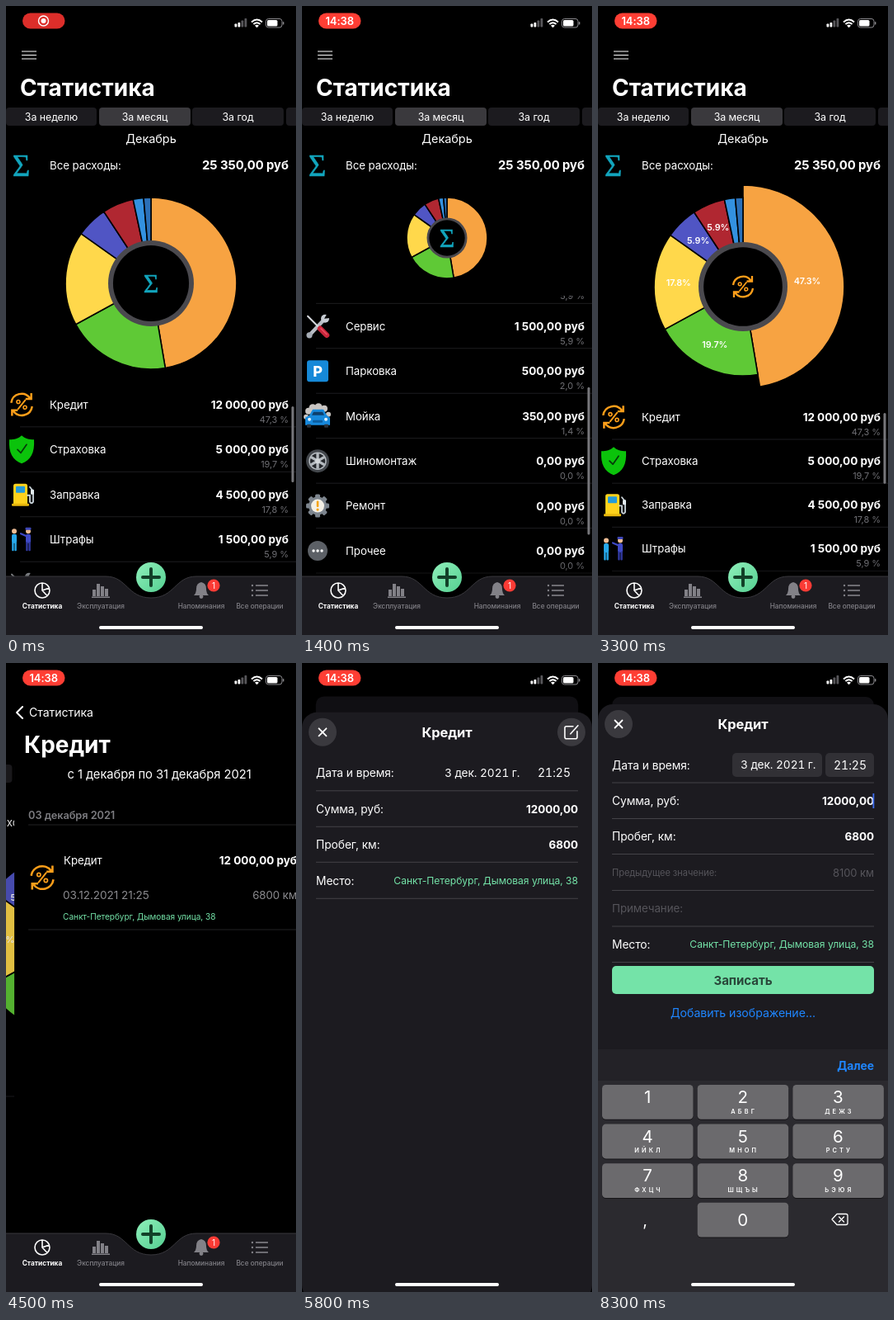
These frames come from a looping animation (352 by 762 pixels, 8.4 s). An HTML page:

```html
<!DOCTYPE html>
<html lang="ru">
<head>
<meta charset="utf-8">
<title>Статистика расходов</title>
<style>
html, body { margin: 0; width: 100%; height: 100%; overflow: hidden; background: #000; }
svg { display: block; width: 352px; height: 762px; }
text { font-family: Inter, "Noto Sans", sans-serif; letter-spacing: -.005em; }
text.sum { font-family: "Liberation Serif", "Noto Serif", serif; letter-spacing: 0; }
text.small { letter-spacing: 0; }
text.tab { font-variant-numeric: tabular-nums; }
text.keys { letter-spacing: .42em; }
</style>
</head>
<body>
<svg id="stage" viewBox="0 0 352 762"></svg>
<script>
const LOOP = 8400, ORANGE = '#ff9f1a', MINT = '#74e3a8', GRAY = '#8a8a8e', BLUE = '#1f86ff';
const ADDRESS = 'Санкт-Петербург, Дымовая улица, 38';

// y is the middle of the capitals
const text = (x, y, str, size, { fill = '#fff', w = 400, at = 'start', cls = '' } = {}) =>
  `<text x="${x}" y="${(y + size * .364).toFixed(2)}" font-size="${size}" fill="${fill}" font-weight="${w}" text-anchor="${at}" class="${cls}">${str}</text>`;
const rect = (x, y, w, h, fill, r = 0) => `<rect x="${x}" y="${y}" width="${w}" height="${h}" rx="${r}" fill="${fill}"/>`;
const circle = (x, y, r, fill, more = '') => `<circle cx="${x}" cy="${y}" r="${r}" fill="${fill}" ${more}/>`;
const line = (d, color, w = 1, more = '') => `<path d="${d}" fill="none" stroke="${color}" stroke-width="${w}" ${more}/>`;
const shape = (d, fill) => `<path d="${d}" fill="${fill}"/>`;
const group = (id, body) => `<g id="${id}">${body}</g>`;
const at = (x, y, body, scale = 1) => `<g transform="translate(${x} ${y}) scale(${scale})">${body}</g>`;
const turn = (angle, body) => `<g transform="rotate(${angle})">${body}</g>`;
const round = 'stroke-linecap="round" stroke-linejoin="round"';
const sigma = (x, y, size) =>
  `<text class="sum" x="${x}" y="${y + size * .33}" font-size="${size}" fill="#12a5bd" stroke="#12a5bd" stroke-width=".5" text-anchor="middle">Σ</text>`;

// ---- Icons, centred on 0,0 ----
const arrow = line('M-12-2A12 12 0 0 1 9.5-7.5M11-13V-6.5H4.5', ORANGE, 2.3);
const person = (x, coat, legs) => circle(x, -10, 3, '#eebd95') + rect(x - 3, -6.5, 6, 11, coat, 2) +
  rect(x - 2.8, 3, 2.4, 11, legs, 1) + rect(x + .4, 3, 2.4, 11, legs, 1);
const icons = {
  credit: arrow + turn(180, arrow) + line('M4-5L-4 5', ORANGE, 1.8, round) +
    circle(-3.8, -3.2, 1.9, 'none', `stroke="${ORANGE}" stroke-width="1.5"`) +
    circle(3.8, 3.2, 1.9, 'none', `stroke="${ORANGE}" stroke-width="1.5"`),
  shield: shape('M0-17C4-13 9-12 15-12C16 4 11 13 0 17C-11 13-16 4-15-12C-9-12-4-13 0-17Z', '#0bc30b') +
    line('M-5 0L-1 4L6-6', '#06380a', 1.7, round),
  fuel: rect(-10, -13, 17, 26, '#ffd21c', 2.5) + rect(-7, -10, 11, 8, '#249bd8', 1) + rect(-12, 11, 21, 3, '#e9b80d', 1) +
    line('M7 1H10V9Q12 12 14 9V-4L10-9', '#c9d3da', 1.8, round) + rect(11, -6, 4, 6, '#e4edf2', 1),
  fines: person(-9, '#27a8ea', '#27a8ea') + person(8, '#3f49c6', '#3139a0') + rect(4.5, -14.5, 7, 3, '#3c45b5', 1) +
    line('M6-4L-1-7', '#3f49c6', 2.2, round),
  service: line('M-9 10L8-8', '#b7bcc4', 4.5, round) + circle(9, -9, 5, '#c6cbd2') + shape('M8-9L12-16L17-10Z', '#000') +
    circle(-10, 11, 3.6, '#a5abb4') + line('M-12-12L1 1', '#d6d9de', 2, round) + line('M3 3L11 11', '#c8263a', 6.5, round) + line('M4 3L11 10', '#ec5064', 1.5, round),
  park: rect(-13, -13, 26, 26, '#1689d8', 3) + text(0, 0, 'P', 18, { w: 800, at: 'middle' }),
  wash: [[-11, -6, 4], [-6, -10, 4.5], [1, -11, 4.5], [8, -9, 4], [-14, 1, 3], [13, -2, 3]].map(c => circle(...c, '#c9c5c2')).join('') +
    shape('M-15 11V2L-10-1L-6-8H7L11-1L15 2V11Z', '#1789dc') + shape('M-7-1L-5-5H6L8-1Z', '#0d3f6c') +
    circle(-10, 4, 2, '#e3f3ff') + circle(10, 4, 2, '#e3f3ff') + rect(-6, 5, 12, 3, '#0c5d9f', 1) +
    rect(-13, 10, 5, 4, '#29323b', 1) + rect(8, 10, 5, 4, '#29323b', 1),
  tire: circle(0, 0, 14, '#43474c') + circle(0, 0, 10, '#24272b', 'stroke="#b4babf" stroke-width="1.5"') +
    [0, 60, 120].map(a => turn(a, rect(-1.7, -9.5, 3.4, 19, '#b4babf'))).join('') + circle(0, 0, 3, '#d3d7da'),
  repair: [0, 45, 90, 135].map(a => turn(a, rect(-3, -14, 6, 28, '#7d858e', 1.5))).join('') +
    circle(0, 0, 11, '#7d858e') + circle(0, 0, 8, '#f4f0e6') + rect(-1.3, -6, 2.6, 7.5, '#f6a415', 1) + circle(0, 4.5, 1.6, '#f6a415'),
  other: circle(0, 0, 12, '#5c6066') + [-5, 0, 5].map(x => circle(x, 0, 1.7, '#fff')).join('')
};

// ---- Data ----
const rows = [
  ['credit', 'Кредит', '12 000,00', '47,3'], ['shield', 'Страховка', '5 000,00', '19,7'],
  ['fuel', 'Заправка', '4 500,00', '17,8'], ['fines', 'Штрафы', '1 500,00', '5,9'],
  ['service', 'Сервис', '1 500,00', '5,9'], ['park', 'Парковка', '500,00', '2,0'],
  ['wash', 'Мойка', '350,00', '1,4'], ['tire', 'Шиномонтаж', '0,00', '0,0'],
  ['repair', 'Ремонт', '0,00', '0,0'], ['other', 'Прочее', '0,00', '0,0']
];
const slices = [[12000, '#f7a342'], [5000, '#5fc936'], [4500, '#ffd84b'], [1500, '#5055c4'], [1500, '#b02731'], [500, '#3391e0'], [350, '#2b70b8']];
const total = slices.reduce((n, s) => n + s[0], 0);

// ---- Statistics screen ----
const heading = label => text(17, 99, label, 28, { w: 700, cls: 'small' });
const segment = (x, w, label, fill) => rect(x, 123, w, 22, fill, 4) + text(x + w / 2, 134, label, 12.4, { at: 'middle' });
const listRow = ([icon, name, sum, pct], i) => group('row' + i,
  at(19, 0, icons[icon], icon === 'credit' ? 1.06 : 1) + text(53, 0, name, 13.3) +
  text(343, 0, sum + ' руб', 13.6, { w: 700, at: 'end' }) +
  text(343, 18, pct + ' %', 11, { fill: '#6f6f74', at: 'end' }) + line('M17 27H352', '#1d1d20'));
const mainScreen =
  group('header', line('M19 55H37M19 59.5H37M19 64H37', '#fff', 1.2) + heading('Статистика')) +
  segment(0, 110, 'За неделю', '#1c1b1f') + segment(113, 111, 'За месяц', '#3a393d') +
  segment(226, 111, 'За год', '#1c1b1f') + rect(340, 123, 30, 22, '#1c1b1f', 4) +
  text(176, 161, 'Декабрь', 14.5, { at: 'middle' }) +
  sigma(18.5, 193.5, 37) + text(53, 193, 'Все расходы:', 13.3) +
  text(343, 193, '25 350,00 руб', 14.9, { w: 700, at: 'end' }) +
  group('chart', slices.map((s, i) => `<path id="slice${i}" fill="${s[1]}" stroke="#000" stroke-width="1.6"/>`).join('') +
    circle(0, 0, 1, '#4a494e', 'id="ring"') + circle(0, 0, 1, '#000', 'id="hole"') +
    group('mark', sigma(0, 0, 32)) + group('pick', icons.credit) +
    group('labels', slices.slice(0, 5).map((s, i) => group('label' + i,
      text(0, 0, (s[0] / total * 100).toFixed(1) + '%', 10.8, { w: 600, at: 'middle' }))).join(''))) +
  `<g clip-path="url(#listClip)">${rows.map(listRow).join('')}</g>` +
  `<rect id="bar" x="346.5" width="3" rx="1.5" fill="#77777b"/>` +
  `<rect id="mainDim" width="480" height="762" opacity="0"/>`;

// ---- Operations of one category ----
const detailScreen = rect(0, 0, 352, 762, '#000') +
  text(176, 135, 'с 1 декабря по 31 декабря 2021', 14.8, { at: 'middle' }) +
  text(17, 184, '03 декабря 2021', 12.8, { fill: '#7c7c80', w: 600 }) +
  line('M17 196H352M17 323H352', '#222225') + at(34, 260, icons.credit, 1.12) +
  text(60, 239, 'Кредит', 13.3) + text(343, 239, '12 000,00 руб', 13.6, { w: 700, at: 'end' }) +
  text(59, 281, '03.12.2021 21:25', 13.6, { fill: GRAY }) + text(343, 281, '6800 км', 13.3, { fill: GRAY, at: 'end' }) +
  text(59, 307, ADDRESS, 10.1, { fill: MINT }) +
  group('detailHead', line('M15 53L8 60L15 67', '#fff', 2, round) + text(23, 60, 'Статистика', 14.1) + heading('Кредит'));

// ---- Tab bar ----
const DIM = '#828187';
const tab = (x, label, on) => text(x, 727, label, 8.3, { fill: on ? '#fff' : DIM, w: on ? 700 : 500, at: 'middle', cls: 'small' });
const tabBar = rect(0, 676, 352, 16, 'url(#shade)') +
  `<path d="M-1 691H121C147 691 147 717 176 717C205 717 205 691 231 691H353V763H-1Z" fill="#1c1b20" stroke="#39383d"/>` +
  circle(176, 692, 18, 'url(#mint)') + line('M176 682V702M166 692H186', '#124028', 4, round) +
  line('M44 699A9 9 0 1 0 44 717A9 9 0 1 0 44 699V708L50 714.5M44 708L52.5 705', '#fff', 1.6) +
  [[105, 8], [110, 15], [115, 12], [120, 9]].map(([x, h]) => rect(x, 715 - h, 4, h, DIM)).join('') + rect(104, 715.5, 22, 1.5, DIM) +
  shape('M228 714Q231 711 231 706Q231 699 237 698Q243 699 243 706Q243 711 246 714Z', DIM) + circle(237, 715.5, 2.4, DIM) +
  circle(252, 702, 7.6, '#fb3b35') + text(252, 702, '1', 10, { at: 'middle' }) +
  [702, 708, 714].map(y => circle(299, y, 1.2, DIM) + rect(303, y - .8, 15, 1.6, DIM)).join('') +
  tab(44, 'Статистика', true) + tab(115, 'Эксплуатация') + tab(237, 'Напоминания') + tab(308, 'Все операции');

// ---- Operation sheet ----
const rule = y => line(`M17 ${y}H335`, '#434247');
const label = (y, str) => text(17, y, str, 13.8);
const field = (y, name, value, w = 700, fill = '#fff', size = 13.5) =>
  label(y, name) + text(335, y, value, size, { w, fill, at: 'end' }) + rule(y + 21.5);
const sheetBody = rect(0, 50, 352, 712, '#1c1b20', 18) +
  circle(25, 74, 17, '#3a393e') + line('M20.5 69.5L29.5 78.5M29.5 69.5L20.5 78.5', '#fff', 1.8, round) +
  text(176, 74, 'Кредит', 16.5, { w: 700, at: 'middle' }) +
  group('edit', circle(327, 74, 17, '#3a393e') +
    line('M329 67H321Q319 67 319 69V80Q319 82 321 82H332Q334 82 334 80V73M326 76L335 66', '#fff', 1.6, round)) +
  group('pills', rect(163, 109, 109, 29, '#313035', 5) + rect(276, 109, 59, 29, '#313035', 5)) +
  label(123.5, 'Дата и время:') + text(173, 123.5, '3 дек. 2021 г.', 13.7, { cls: 'tab' }) +
  text(286, 123.5, '21:25', 14.1, { cls: 'tab' }) + rule(145) +
  field(167, 'Сумма, руб:', '12000,00') + field(210, 'Пробег, км:', '6800') +
  group('extra', text(17, 254, 'Предыдущее значение:', 11.1, { fill: '#55545a' }) +
    text(335, 254, '8100 км', 13, { fill: '#55545a', at: 'end' }) + rule(275.5) +
    text(17, 297, 'Примечание:', 13.4, { fill: '#55545a' }) + rule(319)) +
  group('place', field(254, 'Место:', ADDRESS, 400, MINT, 12.2) +
    group('actions', rect(17, 280, 318, 34, MINT, 5) + text(176, 297, 'Записать', 15.1, { fill: '#29483a', w: 700, at: 'middle' }) +
      text(176, 337, 'Добавить изображение...', 14.2, { fill: BLUE, at: 'middle' }))) +
  `<rect id="caret" x="333.5" y="158" width="1.8" height="18" fill="#3d6df0"/>`;

const keys = ['', 'АБВГ', 'ДЕЖЗ', 'ИЙКЛ', 'МНОП', 'РСТУ', 'ФХЦЧ', 'ШЩЪЫ', 'ЬЭЮЯ'];
const key = (n, col, row, letters) => {
  const x = 5 + col * 115.7, y = 511 + row * 47.6;
  return rect(x, y + 1, 110.5, 41.8, '#161518', 4.5) + rect(x, y, 110.5, 41.8, '#6b6a6d', 4.5) +
    text(x + 55, y + (n ? 14.5 : 20.5), n, 20.5, { at: 'middle' }) +
    text(x + 56.5, y + 32, letters, 7.4, { w: 600, at: 'middle', cls: 'keys' });
};
const keyboard = rect(0, 468, 352, 294, '#2b2a2f') + rect(0, 468, 352, 38, '#232227') +
  text(335, 488, 'Далее', 13.9, { fill: BLUE, w: 700, at: 'end' }) +
  keys.map((k, i) => key(i + 1, i % 3, Math.floor(i / 3), k)).join('') + key(0, 1, 3, '') +
  text(57, 675, ',', 20, { at: 'middle' }) +
  line('M284 674L290 667.5H301Q303 667.5 303 669.5V678.5Q303 680.5 301 680.5H290ZM292.5 671L298.5 677M298.5 671L292.5 677', '#fff', 1.3, round);

// ---- Status bar ----
const status = `<rect id="pill" x="20" y="8.5" width="51.5" height="19" rx="9.5"/>` +
  group('rec', circle(45.5, 18, 6, 'none', 'stroke="#fff" stroke-width="1.4"') + circle(45.5, 18, 3, '#fff')) +
  group('clock', text(45.7, 18, '14:38', 13, { w: 600, at: 'middle' })) +
  [4, 5.5, 8, 10.5].map((h, i) => rect(277.5 + i * 4, 25.5 - h, 2.8, h, i < 2 ? '#fff' : '#58575b', .7)).join('') +
  line('M298 19.5Q304.5 13.5 311 19.5M300.4 22Q304.5 18.3 308.6 22', '#fff', 1.9) + shape('M304.5 26.3L302 23.7Q304.5 21.7 307 23.7Z', '#fff') +
  `<rect x="315.5" y="15.5" width="19.5" height="10.5" rx="3" fill="none" stroke="#8a898d"/>` + rect(317, 17, 12.5, 7.5, '#fff', 1.6) + rect(336, 19, 1.4, 3.6, '#8a898d', .7);

const svg = document.getElementById('stage');
svg.innerHTML = `<defs>
  <clipPath id="listClip"><rect id="clipBox" width="352" height="400"/></clipPath>
  <linearGradient id="shade" x2="0" y2="1"><stop stop-color="#000" stop-opacity="0"/><stop offset="1" stop-color="#000" stop-opacity=".5"/></linearGradient>
  <linearGradient id="mint" x2="1" y2="1"><stop stop-color="#8ff0bb"/><stop offset="1" stop-color="#55cf91"/></linearGradient>
  </defs>` + rect(0, 0, 352, 762, '#000') +
  group('app', group('main', mainScreen) + group('detail', detailScreen) + tabBar + `<rect id="cardDim" width="352" height="762" rx="11" fill="#111014"/>`) +
  group('sheet', sheetBody) + group('keyboard', keyboard) + status + rect(113, 751, 126, 4, '#fff', 2);

// ---- Motion ----
const el = Object.fromEntries([...svg.querySelectorAll('[id]')].map(n => [n.id, n]));
const set = (id, attrs) => { for (const k in attrs) el[id].setAttribute(k, attrs[k]); };
const move = (id, x, y) => set(id, { transform: `translate(${x} ${y})` });
const fade = (id, o) => set(id, { opacity: o });
const ramp = (t, a, b) => Math.min(1, Math.max(0, (t - a) / (b - a)));
const out = u => 1 - (1 - u) ** 3;

// time, chart radius, list scroll
const drag = [[0, 104, 0], [150, 98, 12], [300, 83, 42], [450, 64, 80], [600, 49, 111], [800, 49, 150], [1000, 49, 180],
  [1250, 49, 200], [1500, 49, 205], [1950, 49, 205], [2050, 56, 202], [2200, 75.5, 190], [2350, 92, 125], [2500, 102, 52], [2650, 104, 14], [2800, 104, 0]];
function dragAt(t) {
  const i = drag.findIndex(k => k[0] > t);
  if (i < 0) return drag[drag.length - 1].slice(1);
  const a = drag[i - 1], b = drag[i], u = ramp(t, a[0], b[0]);
  return [1, 2].map(n => a[n] + (b[n] - a[n]) * u);
}

function drawChart(R, sel) {
  move('chart', 176, 232 + R);
  let from = 0;
  const point = (a, r) => `${(Math.sin(a) * r).toFixed(2)} ${(-Math.cos(a) * r).toFixed(2)}`;
  slices.forEach(([value], i) => {
    const to = from + value / total * 2 * Math.PI, r = i ? R : R * (1 + .139 * sel);
    set('slice' + i, { d: `M0 0L${point(from, r)}A${r} ${r} 0 0 1 ${point(to, r)}Z` });
    const mid = (from + to) / 2;
    if (i < 5) move('label' + i, Math.sin(mid) * R * .725, -Math.cos(mid) * R * .725);
    from = to;
  });
  set('ring', { r: R * .5 });
  set('hole', { r: R * .443 });
  fade('labels', sel);
  fade('mark', 1 - sel);
  fade('pick', sel);
}

// Choosing a slice leaves only its own row in the list
function drawList(R, scroll, sel, filter) {
  const top = 253 + 2 * R, first = 275 + 2 * R + 7 * sel - scroll, pitch = 54.45 - 1.3 * sel;
  set('clipBox', { y: top, height: 762 - top });
  rows.forEach((_, i) => {
    move('row' + i, 0, first + i * pitch);
    fade('row' + i, i ? 1 - filter : 1);
  });
  const len = 92 + 1.58 * (104 - R);
  set('bar', { y: top + 24 + scroll * (.23 + .0011 * len), height: len });
  fade('bar', 1 - filter);
}

function draw(t) {
  const [r, scroll] = dragAt(t), sel = out(ramp(t, 2900, 3250));
  const R = r + 4 * sel;
  drawChart(R, sel);
  drawList(R, scroll, sel, ramp(t, 3350, 3650));

  const push = out(ramp(t, 4050, 4700)), off = 352 * (1 - push);
  move('main', -105.6 * push, 0);
  fade('mainDim', .12 * push);
  fade('header', 1 - Math.min(1, push * 1.4));
  move('detail', off, 0);
  move('detailHead', -off / 2, 0);
  fade('detailHead', Math.min(1, push * 1.1));

  const up = out(ramp(t, 5430, 5918)), s = 1 - .0966 * up;
  set('app', { transform: `translate(${176 * (1 - s)} ${41 * up}) scale(${s})` });
  fade('cardDim', up);
  move('sheet', 0, 712 * (1 - up));

  const edit = out(ramp(t, 7150, 7750));
  fade('edit', t < 6800 || t >= 7000 ? 1 - ramp(t, 7150, 7350) : .5);
  ['pills', 'extra', 'actions'].forEach(id => fade(id, edit));
  move('place', 0, 87 * edit);
  move('keyboard', 0, 296 * (1 - edit));
  fade('caret', t > 7500 && (t < 8050 || t >= 8200) ? 1 : 0);

  const recording = t < 1300;
  set('pill', { fill: recording ? '#dc2e2a' : '#ff3e34' });
  fade('rec', recording ? 1 : 0);
  fade('clock', recording ? 0 : 1);
}

const start = performance.now();
(function tick() {
  draw((performance.now() - start) % LOOP);
  requestAnimationFrame(tick);
})();
</script>
</body>
</html>
```
